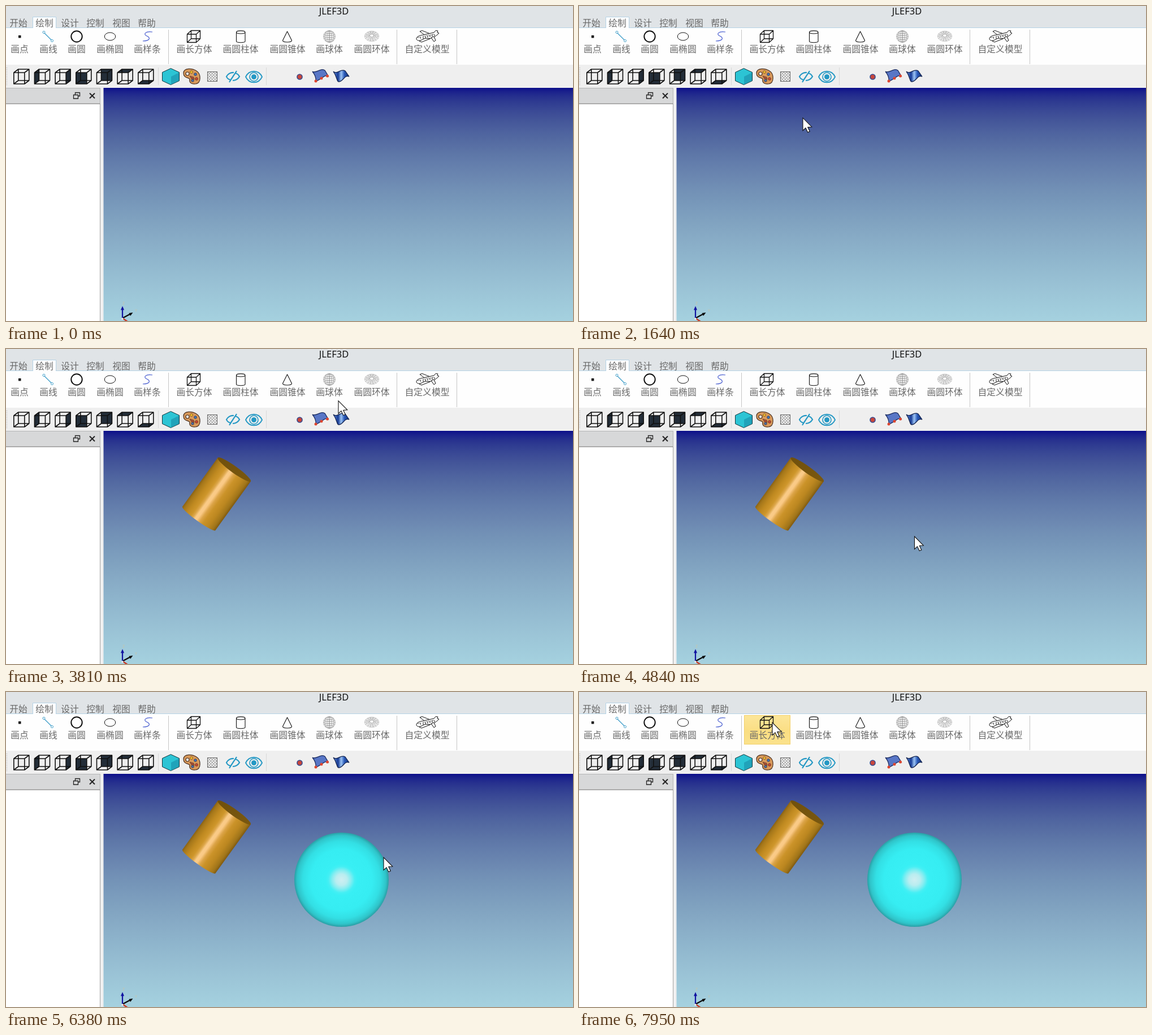
These frames come from a looping animation (1003x558 px, 8 s). An HTML page:

```html
<!DOCTYPE html>
<html lang="zh">
<head>
<meta charset="utf-8">
<title>JLEF3D</title>
<style>
html, body { margin: 0; width: 100%; height: 100%; overflow: hidden; background: #fff; }
svg { display: block; width: 100vw; height: 100vh; }
text { font: 300 15.8px "Noto Sans CJK SC", "Noto Sans CJK", sans-serif; fill: #686868; text-anchor: middle; }
.title { font: 400 16.5px "Noto Sans", "Open Sans", sans-serif; fill: #111; }
.axis { font: 7px "Noto Sans", sans-serif; fill: #c8c4a8; }
.line { fill: none; stroke: #111; stroke-width: 1.3; stroke-linejoin: round; }
.thin { fill: none; stroke: #888; stroke-width: .55; }
</style>
</head>
<body>
<svg id="stage" viewBox="0 0 1003 558" preserveAspectRatio="none">
  <defs>
    <linearGradient id="sky" x1="0" y1="0" x2="0" y2="1"></linearGradient>
    <linearGradient id="metal"></linearGradient>
    <radialGradient id="cyan"></radialGradient>
    <radialGradient id="gold"></radialGradient>
    <linearGradient id="glow" x1="0" y1="0" x2="0" y2="1"></linearGradient>
    <linearGradient id="wave"></linearGradient>
    <linearGradient id="cap"></linearGradient>
    <pattern id="checks" width="5" height="5" x="356" y="116" patternUnits="userSpaceOnUse">
      <rect width="5" height="5" fill="#f4f4f4"/><path d="M0 0h2.5v5H5V2.5H0Z" fill="#aaa"/>
    </pattern>
    <clipPath id="view"><rect x="173" y="145" width="830" height="413"/></clipPath>
  </defs>

  <rect width="1003" height="39" fill="#e0e4e7"/>
  <rect y="38" width="1003" height="1" fill="#b5d3e6"/>
  <rect y="39" width="1003" height="65" fill="#fefefe"/>
  <rect y="104" width="1003" height="41" fill="#efefef"/>
  <path d="M47.5 39V19.5h41V39" fill="#fefefe" stroke="#b5d3e6"/>
  <rect id="tabHover" y="18.5" width="41" height="20" fill="#f3f7fa" stroke="#b5d3e6"/>
  <rect id="toolHover" y="41.5" height="51" fill="url(#glow)" stroke="#f2cf68"/>
  <text class="title" x="580" y="15">JLEF3D</text>
  <g id="labels"></g>
  <path d="M287.5 42v61M691.5 42v61M797.5 42v61" stroke="#c6c6c6"/>

  <g id="ribbonIcons">
    <rect x="22" y="52" width="4.5" height="4.5" fill="#111"/>
    <path d="M67 47L81 61" stroke="#3c9cc8" stroke-width="1.2"/>
    <g fill="#fff" stroke="#3c9cc8"><circle cx="67" cy="46.5" r="2"/><circle cx="81.5" cy="61.5" r="2"/></g>
    <circle class="line" cx="125" cy="54" r="9.7" style="stroke-width:2"/>
    <ellipse class="line" cx="184" cy="54" rx="9.7" ry="7" style="stroke-width:1"/>
    <path d="M259 46C247 44 242 50 249 53S255 62 242 62" fill="none" stroke="#4a5fd0" stroke-width="1.2"/>
    <path class="line" d="M320.5 50h16v14.5h-16ZM327.5 43.5h16v14.5h-16ZM320.5 50l7-6.5M336.5 50l7-6.5M336.5 64.5l7-6.5M320.5 64.5l7-6.5"/>
    <path class="line" style="stroke-width:1.1" d="M407.5 46.5v16c0 3 15.5 3 15.5 0v-16c0-3.5-15.5-3.5-15.5 0c0 3.3 15.5 3.3 15.5 0"/>
    <path class="line" style="stroke-width:1.1" d="M497.5 45L489.5 61c0 4 16 4 16 0Z"/>
    <g id="globe" class="thin"></g>
    <g id="torus" class="thin"></g>
    <g class="line" style="stroke-width:1" fill="#fff">
      <path fill="#fff" d="M740 51L732 45L736 43.5L750 49Z"/>
      <path fill="#fff" d="M726 58C726 53 734 52 743 50L757 47L760 43.5L764 44L763 47L766 48L763 51C757 56 748 59 737 61C730 62 726 61 726 58Z"/>
      <path fill="#fff" d="M742 57L731 62L735 64L750 58ZM752 56L757 63L760 61L757 54Z"/>
      <path d="M728 56L734 55L733 58M737 54L757 50" stroke-dasharray="2 1.5"/>
      <path d="M738 55v3M742 54v3M746 53v3M750 52v3M754 51v3M758 50v3"/>
    </g>
  </g>

  <path d="M1.5 109v33" stroke="#aaa" stroke-dasharray="1 2"/>
  <path d="M269.5 109v31M460.5 109v31" stroke="#d8d8d8"/>
  <g id="cubes"></g>
  <g stroke="#12363d" stroke-width="1" stroke-linejoin="round">
    <path fill="#2cc4d4" d="M291.5 110.5l15 7v15l-15 7l-15-7v-15Z"/>
    <path stroke="none" fill="#21a3ba" d="M292 125l14-7v14l-14 7Z"/>
  </g>
  <g stroke="#4a3020" stroke-width="1.2">
    <path fill="#d99a5c" d="M314 119C314 109 330 110 337 115C345 120 346 137 335 138C326 139 324 134 325 130C325 126 314 129 314 119Z"/>
    <circle cx="321" cy="120" r="3" fill="#f3eee6"/>
    <g stroke-width=".6">
      <circle cx="328" cy="117" r="2.5" fill="#f0b92c"/><circle cx="335" cy="121" r="2.5" fill="#3a71b8"/>
      <circle cx="337" cy="129" r="2.5" fill="#ca4732"/><circle cx="330" cy="132" r="2.5" fill="#496aa0"/>
      <path fill="#a84c36" d="M325 124l7 2l1 4l-5-1Z"/>
    </g>
  </g>
  <rect x="356.5" y="116.5" width="17" height="17" fill="url(#checks)" stroke="#666"/>
  <g fill="none" stroke="#2498c4" stroke-width="2.2">
    <path d="M403 118c-6-1-11 3-13 7c1 3 4 5 7 6M406 119c4 1 6 4 7 6c-3 5-7 7-12 7M408 115l-13 20M404 121l-6 9"/>
    <path d="M424 125.5c6-13 23-13 29 0c-6 13-23 13-29 0Z" stroke-width="1.8"/>
    <circle cx="438.5" cy="125.5" r="7.500" stroke-width="1.6"/>
    <circle cx="438.5" cy="125.5" r="4.5" fill="#2498c4" stroke="none"/>
  </g>
  <circle cx="519.5" cy="125.5" r="4.5" fill="#c8463c" stroke="#33498e" stroke-width="1.6"/>
  <path d="M542 116C550 120 555 109 564 114L570 124C562 121 558 131 548 133C549 126 546 121 542 116Z" fill="#5876c6" stroke="#1c2d62" stroke-width="1.3"/>
  <g fill="#de4630"><circle cx="548" cy="133" r="2.5"/><circle cx="558" cy="128" r="2.5"/><circle cx="568.5" cy="124" r="2.5"/></g>
  <path d="M579 116C586 122 592 110 600 115L607 125C599 121 596 135 588 134C585 133 586 126 579 116Z" fill="url(#wave)" stroke="#142450" stroke-width="1.3"/>

  <rect y="145" width="173" height="413" fill="#f0f0f0"/>
  <rect x="-1" y="145.5" width="167.5" height="27" fill="#d7d8d9" stroke="#b5b5b5"/>
  <rect x="-1" y="173.5" width="167.5" height="390" fill="#fff" stroke="#a0a0a0"/>
  <path d="M122.5 157v-3.5h8v6h-3M119.5 157.5h8v6.5h-8Z" fill="none" stroke="#222" stroke-width="1.3"/>
  <path d="M148 154.5l9 9m0-9l-9 9" stroke="#222" stroke-width="2"/>

  <rect x="172.5" y="145" width="830.5" height="413" fill="url(#sky)"/>
  <g clip-path="url(#view)">
    <text class="axis" x="208" y="529">Z</text>
    <text class="axis" x="230" y="542">Y</text>
    <path d="M206 553l9 6" stroke="#c93a26" stroke-width="2.5"/>
    <path d="M206 553l13-7" stroke="#0a0a0a" stroke-width="2.2"/>
    <path d="M224.5 543l-7 1l2.5 5Z" fill="#0a0a0a"/>
    <path d="M206 553v-16" stroke="#1010a0" stroke-width="2.2"/>
    <path d="M206 531.5l-3 7h6Z" fill="#1010a0"/>
    <circle cx="206" cy="554" r="1.8" fill="#eee"/>
    <g id="cylinder">
      <path d="M-36 -107V0A36 5 0 0 0 36 0V-107Z" fill="url(#metal)"/>
      <ellipse cy="-107" rx="36" ry="6" fill="url(#cap)"/>
    </g>
    <circle id="ball" cx="593.5" cy="332.5"/>
    <path id="mark" d="M-3.5 0h7M0 -3.5v7" stroke="#f0f3f8" stroke-width="1.2"/>
  </g>
  <circle id="click" r="16" fill="#ff0" fill-opacity=".47"/>
  <path id="cursor" d="M0 0V22.5L5 17.8L8.7 25.5L12.3 24L8.8 16.5L15.8 16Z" fill="#fff" stroke="#111" stroke-width="1.1"/>
</svg>
<script>
const $ = id => document.getElementById(id);
const show = (id, on) => $(id).setAttribute('visibility', on ? 'visible' : 'hidden');
const set = (id, attrs) => { for (const k in attrs) $(id).setAttribute(k, attrs[k]); };

// "offset color" pairs
function stops(id, list) {
  $(id).innerHTML = list.split(',').map(s => {
    const [offset, color] = s.trim().split(' ');
    return `<stop offset="${offset}" stop-color="${color}"/>`;
  }).join('');
}

// blend two colors in linear light
function blend(from, to, k) {
  const hex = from.map((c, i) => {
    const light = (1 - k) * (c / 255) ** 2.2 + k * (to[i] / 255) ** 2.2;
    return Math.round(255 * light ** (1 / 2.2)).toString(16).padStart(2, '0');
  });
  return '#' + hex.join('');
}
stops('sky', Array.from({ length: 33 }, (_, i) => {
  const k = (i / 32) ** 2;
  return `${k} ${blend([8, 8, 138], [165, 209, 223], k)}`;
}).join());
stops('metal', '0 #8a6214, .06 #a5771a, .18 #bf8920, .3 #ce962b, .36 #dca64a, .42 #facb88, .48 #fac985, .56 #dca448, .65 #cb9329, .8 #bc8720, .93 #a0751a, 1 #80590f');
stops('cap', '0 #70500c, 1 #7a5810');
stops('cyan', '0 #cfeef1, .12 #b9edf0, .2 #86edf1, .28 #44eff4, .34 #38eff4, .65 #36edf2, .82 #33dfe4, .94 #2fc4c9, 1 #2a9fa5');
stops('gold', '0 #ffe2b4, .12 #fbd090, .2 #e3ae50, .32 #d29a30, .7 #c78e20, .9 #a57616, 1 #7a560e');
stops('glow', '0 #fce699, .4 #fbe08a, .55 #fade82, 1 #fbe28c');
stops('wave', '0 #5f8bdb, .3 #183c96, .5 #9cc4f4, .7 #2858b8, 1 #173476');

const label = (y, x, s) => `<text x="${x}" y="${y}">${s}</text>`;
const tabs = { 开始: 22, 绘制: 68, 设计: 113, 控制: 158, 视图: 204, 帮助: 249 };
const tools = { 画点: 24, 画线: 75, 画圆: 125, 画椭圆: 184, 画样条: 250, 画长方体: 333, 画圆柱体: 415,
  画圆锥体: 498, 画球体: 572, 画圆环体: 647, 自定义模型: 745 };
$('labels').innerHTML = Object.entries(tabs).map(([s, x]) => label(36, x, s)).join('') +
  Object.entries(tools).map(([s, x]) => label(82, x, s)).join('');

const ellipse = (x, y, rx, ry) => `<ellipse cx="${x}" cy="${y}" rx="${rx}" ry="${ry}"/>`;
$('globe').innerHTML = [10.5, 8, 4, .3].map(r => ellipse(572, 54, r, 10.5)).join('') +
  [-7, -3.5, 0, 3.5, 7].map(d => ellipse(572, 54 + d, Math.sqrt(110 - d * d), 1.5)).join('');
$('torus').innerHTML = [12.5, 10, 7, 4].map(r => ellipse(647, 53.5 - (12.5 - r) / 8, r, r * .72)).join('') +
  Array.from({ length: 14 }, (_, i) => {
    const a = i * Math.PI / 7, c = Math.cos(a), s = Math.sin(a);
    return `<path d="M${647 + 3 * c} ${52.5 + 2 * s}L${647 + 12.5 * c} ${53.5 + 9 * s}"/>`;
  }).join('');

const faces = ['', 'M0 6l8-6v20l-8 6Z', 'M19 6l8-6v20l-8 6Z', 'M0 6h19v20H0Z', 'M8 0h19v20H8Z', 'M0 6l8-6h19l-8 6Z', 'M0 26l8-6h19l-8 6Z'];
$('cubes').innerHTML = faces.map((face, i) => `<g transform="translate(${13.8 + i * 36.67} 112)">
  <path d="${face}" fill="#232d38"/>
  <path class="line" style="stroke-width:1.6" d="M0 6h19v20H0ZM8 0h19v20H8ZM0 6l8-6M19 6l8-6M19 26l8-6M0 26l8-6"/></g>`).join('');

// cursor tip: time, x, y
const path = [
  [220, 119, 432], [280, 119, 432], [590, 292, 262], [760, 402, 120], [900, 433, 66], [1370, 433, 66],
  [1570, 424, 147], [1780, 341, 298.5], [2190, 341, 298.5], [2520, 420, 276], [2870, 443, 262],
  [3470, 443, 262], [3710, 637, 147], [3810, 588, 92], [4020, 579, 72], [4500, 579, 72],
  [4700, 588, 230], [4840, 593.5, 332], [5180, 593.5, 332], [5780, 668, 293], [6590, 668, 293],
  [7000, 149, 88], [7210, 112, 30], [7550, 112, 30], [7680, 206, 30], [7820, 206, 30], [7950, 342, 54]
];
const clicks = [[1230, 1430], [1980, 2250], [3130, 3330], [4280, 4560], [5040, 5240], [6110, 6380]];
const buttons = [[292, 374], [374, 456], [540, 605]];
const within = (t, a, b) => t >= a && t < b;

function tipAt(t) {
  const i = path.findIndex(p => p[0] > t);
  if (i < 0) return path[path.length - 1].slice(1);
  if (i === 0) return path[0].slice(1);
  const [t0, x0, y0] = path[i - 1], [t1, x1, y1] = path[i], k = (t - t0) / (t1 - t0);
  return [x0 + (x1 - x0) * k, y0 + (y1 - y0) * k];
}

function draw(t) {
  const [x, y] = tipAt(t), visible = t >= 280;
  show('cursor', visible);
  set('cursor', { transform: `translate(${x} ${y})` });

  const button = visible && y > 41 && y < 91 && buttons.find(b => within(x, ...b));
  show('toolHover', button);
  if (button) set('toolHover', { x: button[0] + .5, width: button[1] - button[0] - 1 });
  const tab = visible && y > 18 && y < 39 && Object.values(tabs).find(c => Math.abs(x - c) < 22);
  show('tabHover', tab);
  if (tab) set('tabHover', { x: tab - 20.5 });

  show('click', clicks.some(c => within(t, ...c)));
  set('click', { cx: x, cy: y });

  // both solids follow the cursor's distance from their first point until placed
  const solid = t >= 2590, round = t >= 5510;
  const height = t < 2870 ? Math.hypot(x - 341, y - 299) / 108.5 : 1;
  show('cylinder', solid);
  set('cylinder', { transform: `translate(341.2 300.3) rotate(35.8) scale(${height})` });
  show('ball', round);
  set('ball', {
    r: t < 5780 ? Math.hypot(x - 593.5, y - 332) * .993 : 83.5,
    fill: `url(#${t < 6110 ? 'gold' : 'cyan'})`
  });
  show('mark', within(t, 1980, 2590) || within(t, 5040, 5510));
  set('mark', { transform: t < 4000 ? 'translate(341 299.5)' : 'translate(593.5 332)' });
}

const start = performance.now();
function tick() {
  draw((performance.now() - start) % 8000);
  requestAnimationFrame(tick);
}
tick();
</script>
</body>
</html>
```
